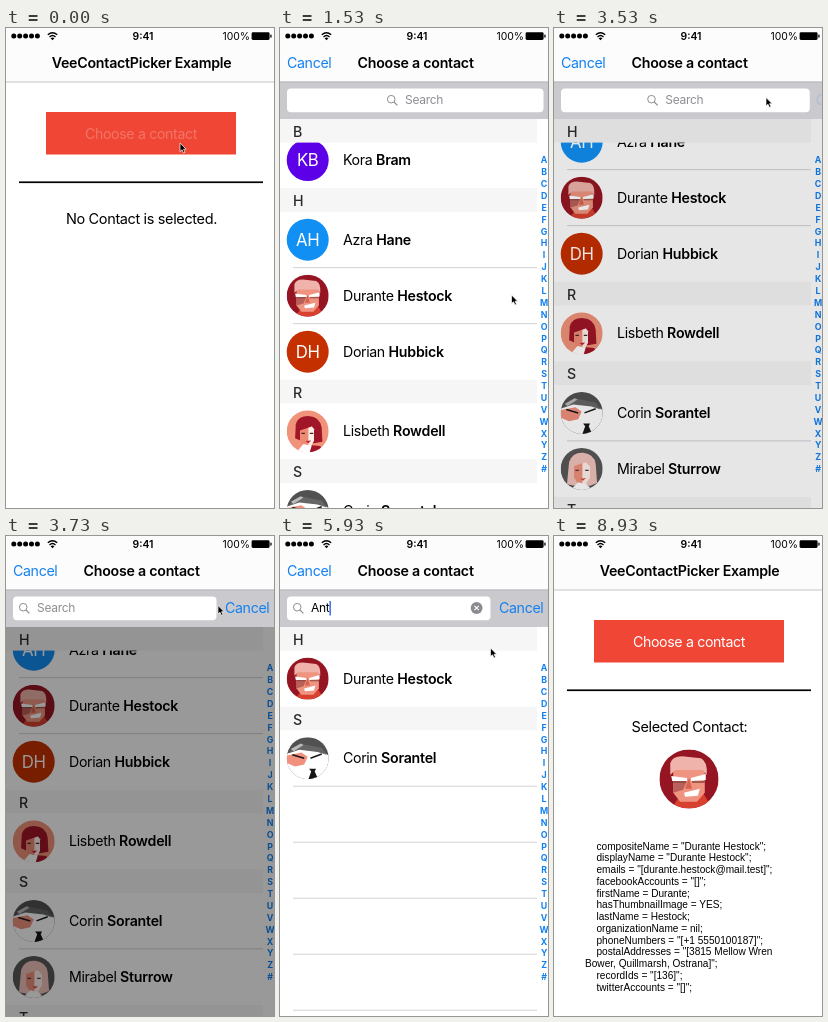
These frames come from a looping animation (268x480 px, 8990 ms). An HTML page:

```html
<!DOCTYPE html>
<html lang="en">
<head>
<meta charset="utf-8">
<title>Contact picker demo</title>
<style>
  html, body { margin: 0; width: 100%; height: 100%; overflow: hidden; background: #fff; }
  svg { display: block; width: 100%; height: 100%; }
  text { font: 14.2px Inter, "Open Sans", sans-serif; letter-spacing: -.025em; white-space: pre; }
  .b { font-weight: 600; letter-spacing: -.017em; }
  .mid { text-anchor: middle; }
  .link { fill: #1280f0; }
  .note { font-size: 14.5px; }
  .head { font-weight: 500; fill: #2b2b2b; }
  .init { font-size: 16.8px; fill: #fff; }
  .status { font-size: 10.4px; letter-spacing: 0; }
  .search { font-size: 12px; }
  .index { font-size: 8.8px; font-weight: 700; letter-spacing: 0; }
  .log { font: 10.1px "Liberation Sans", Arial, sans-serif; letter-spacing: 0; }
</style>
</head>
<body>
<svg id="stage" viewBox="0 0 268 480">
  <defs>
    <clipPath id="disc"><circle r="30"/></clipPath>
  </defs>
  <g id="scene"></g>
</svg>
<script>
const LOOP = 8990, FPS = 15, W = 268, H = 480;
const TOP = 91, ROW = 56, HEAD = 23.6, EDGE = 257;

const contacts = [
  ['Kora', 'Bram', '#5c00e8'],
  ['Azra', 'Hane', '#128ff2'],
  ['Durante', 'Hestock', 'hero'],
  ['Dorian', 'Hubbick', '#c53000'],
  ['Lisbeth', 'Rowdell', 'bob'],
  ['Corin', 'Sorantel', 'suit'],
  ['Mirabel', 'Sturrow', 'blonde'],
  ['Jonah', 'Tarrick', '#2a9d6f'],
];
const chosen = contacts[2];

const log = [
  'compositeName = "Durante Hestock";',
  'displayName = "Durante Hestock";',
  'emails = "[durante.hestock@mail.test]";',
  'facebookAccounts = "[]";',
  'firstName = Durante;',
  'hasThumbnailImage = YES;',
  'lastName = Hestock;',
  'organizationName = nil;',
  'phoneNumbers = "[+1 5550100187]";',
  'postalAddresses = "[3815 Mellow Wren',
  'Bower, Quillmarsh, Ostrana]";',
  'recordIds = "[136]";',
  'twitterAccounts = "[]";',
];

// Pointer keys: time, x, y
const pointer = [
  [533, 174, 115], [1333, 231.5, 278], [1400, 231.5, 278], [1533, 231.5, 267],
  [2467, 223, 177.5], [2600, 223, 177.5], [3267, 212, 69.5], [5533, 212, 69.5],
  [5933, 210.5, 112], [6333, 202, 140], [7533, 202, 140], [7800, 261, 212],
  [8000, 261, 212], [8133, 272, 228],
];

const clamp = v => Math.min(1, Math.max(0, v));
const part = (t, a, b) => clamp((t - a) / (b - a));
const easeOut = p => 1 - (1 - p) ** 3;
const smooth = p => p * p * (3 - 2 * p);
const within = (t, a, b) => t >= a && t < b;

const rect = (x, y, w, h, fill, more = '') =>
  `<rect x="${x}" y="${y}" width="${w}" height="${h}" fill="${fill}" ${more}/>`;
const text = (x, y, s, cls = '', more = '') =>
  `<text x="${x}" y="${y}" class="${cls}" ${more}>${s}</text>`;
const path = (d, fill) => `<path d="${d}" fill="${fill}"/>`;
const stroke = (d, color, w) =>
  `<path d="${d}" fill="none" stroke="${color}" stroke-width="${w}"/>`;
const move = (x, y, body) => `<g transform="translate(${x} ${y})">${body}</g>`;

const faces = {
  hero: rect(-30, -30, 60, 60, '#961522') +
    path('M-18 30L-9 17L14 14L24 30Z', '#d8402f') +
    path('M-16-10H16V14L8 23H-9L-16 14Z', '#ef9480') +
    path('M-16 2H-2L-6 11L-16 14Z', '#b9605a') +
    path('M-19-4V-16Q-17-23-7-23L12-21Q19-18 18-4L14-9H-14Z', '#efb3ab') +
    path('M-18-3L-2-1V2L-17 2ZM2-1L17-5V1L2 2Z', '#fff') +
    stroke('M-16 3H-3M3 3H16', '#8b4540', 1.6) +
    path('M0-1L-4 10H3Z', '#d8614f') +
    path('M-5 14L11 10L9 17L-4 18Z', '#fff'),
  bob: rect(-30, -30, 60, 60, '#f1937a') +
    path('M-18 10L-17-10Q-14-22 1-22Q18-21 20-5L21 15L9 17L-9 14Z', '#a01528') +
    path('M-11-1L6-7L9-3V13L5 21H-6L-11 13Z', '#ed8b75') +
    path('M1-5L6-7L9-3V13L5 21H1Z', '#fff1e9') +
    path('M-16 30L-6 18L6 21L3 30Z', '#fff') +
    path('M3 30L6 20L18 21L22 30Z', '#a01528') +
    stroke('M-9 3H-4M3 3H8', '#4c2228', 1.8) +
    path('M-3 14L5 13L1 17Z', '#c32032'),
  suit: rect(-30, -30, 60, 60, '#515151') +
    path('M-30-6L-12-14L20-10L30-4V30H-30Z', '#fff') +
    path('M-30-4L-9-8L0-2L-5 9L-18 12L-30 7Z', '#f0907d') +
    path('M-27-7Q-20-20-6-20L20-15L27-5L14-9L-12-12Z', '#666') +
    path('M-24-13L-10-21L-6-19L-20-10Z', '#bbb') +
    stroke('M-22-5L-5 0M4 0L20-6', '#171717', 2.2) +
    path('M-30 30V20L-19 25L-14 30ZM20 30L24 20L30 16V30Z', '#202020') +
    path('M2 15H12L10 19L15 30H1L5 19Z', '#161616'),
  blonde: rect(-30, -30, 60, 60, '#585858') +
    path('M-21 22L-18-10Q-13-24 2-23Q18-21 20-7L22 20L12 24H-10Z', '#f0c3bb') +
    path('M-11-4L6-10L12-3V12L6 22H-5L-11 12Z', '#ee8f7b') +
    path('M1-8L6-10L12-3V12L6 22H1Z', '#fff0ea') +
    path('M-16 30L-5 19L7 22L15 30Z', '#fff') +
    stroke('M-9 2H-4M5 2H10', '#493d3d', 1.7) +
    path('M-2 14L6 13L2 17Z', '#cf4942'),
};

function avatar([first, last, look], x, y, r) {
  if (faces[look]) {
    return `<g transform="translate(${x} ${y}) scale(${r / 30})"><g clip-path="url(#disc)">${faces[look]}</g></g>`;
  }
  return `<circle cx="${x}" cy="${y}" r="${r}" fill="${look}"/>` +
    text(x, y + 6.4, first[0] + last[0], 'init mid');
}

function statusBar() {
  let s = '';
  for (let i = 0; i < 5; i++) s += `<circle cx="${7.8 + i * 5.9}" cy="8" r="2.5"/>`;
  s += stroke('M41.8 6.8Q46.5 2.6 51.2 6.8M43.5 8.9Q46.5 6.2 49.5 8.9', '#000', 1.4);
  s += path('M46.5 12.2L44.6 10.3Q46.5 8.8 48.4 10.3Z', '#000');
  s += text(137, 11.8, '9:41', 'status b mid') + text(216.5, 11.8, '100%', 'status');
  s += rect(245.6, 4.3, 18, 7.6, '#000', 'rx="1.4"') + rect(264.3, 6.5, 1.3, 3.2, '#000', 'rx=".6"');
  return s;
}

function navBar(title) {
  return rect(0, 0, W, 54, '#fcfcfc') + rect(0, 53.6, W, .8, '#b4b4b6') +
    text(135.6, 40, title, 'b mid');
}

function home(t) {
  let s = rect(0, 0, W, H, '#fff') + navBar('VeeContactPicker Example');
  s += rect(40, 84, 190, 42.5, '#ef4635');
  s += text(135, 110.5, 'Choose a contact', 'mid', `fill="#fff" fill-opacity="${t < 200 ? .25 : 1}"`);
  s += rect(13, 153.4, 244, 1.7, '#000');
  if (t < 6600) return s + text(135.5, 196, 'No Contact is selected.', 'note mid');
  s += text(135.5, 196, 'Selected Contact:', 'note mid') + avatar(chosen, 135, 243, 29.6);
  log.forEach((line, i) => {
    s += text(i === 10 ? 31 : 42.5, 313.7 + i * 11.75, line, 'log');
  });
  return s;
}

function list(query, scroll, picked) {
  const hits = contacts.filter(c => (c[0] + ' ' + c[1]).toLowerCase().includes(query.toLowerCase()));
  const heads = [];
  let y = TOP - scroll, s = rect(0, TOP, W, H - TOP, '#fff');
  const line = at => rect(13, at - .4, EDGE - 13, .8, '#c8c7cc');
  hits.forEach((c, i) => {
    const key = c[1][0], next = hits[i + 1];
    if (!i || hits[i - 1][1][0] !== key) {
      heads.push([key, y]);
      y += HEAD;
    }
    if (y < H && y > TOP - ROW) {
      if (picked && c === chosen) s += rect(0, y, EDGE, ROW, '#b4b4b4');
      s += avatar(c, 27.7, y + 28, 21) +
        text(63, y + 33, `${c[0]} <tspan class="b">${c[1]}</tspan>`);
    }
    y += ROW;
    if (!next || next[1][0] === key) s += line(y);
  });
  for (y += ROW; y < H; y += ROW) s += line(y);

  heads.forEach(([key, at], i) => {
    const limit = i + 1 < heads.length ? heads[i + 1][1] - HEAD : H;
    const top = Math.min(Math.max(TOP, at), limit);
    s += rect(0, top, EDGE, HEAD, '#f6f6f6') + text(13, top + 17.9, key, 'head');
  });
  [...'ABCDEFGHIJKLMNOPQRSTUVWXYZ#'].forEach((ch, i) => {
    s += text(264.1, 135.3 + i * 11.88, ch, 'index link mid');
  });
  return s;
}

function searchBar(t, query) {
  const p = smooth(part(t, 3470, 3733)), slide = 94 * (1 - p);
  let s = rect(0, 54, W, 37, '#c9c9ce') + rect(0, 53.6, W, .8, '#b4b4b6');
  s += rect(7, 60.5, 256.5 - 53 * p, 23.7, '#fff', 'rx="4"');
  s += move(18 + slide, 72,
    '<circle cx="-.8" cy="-.8" r="3.8" fill="none" stroke="#8e8e93"/>' + stroke('M2 2L5.4 5.4', '#8e8e93', 1.2));
  s += query
    ? text(31, 76.3, query, 'search', 'id="query"')
    : text(31 + slide, 76.3, 'Search', 'search', 'fill="#8e8e93"');
  if (query) {
    s += '<circle cx="196.6" cy="72" r="5.9" fill="#8a8a8f"/>' +
      stroke('M194.4 69.8L198.8 74.2M198.8 69.8L194.4 74.2', '#fff', 1.1);
  }
  const blink = within(t, 4000, 4260) || within(t, 5330, 5530) || within(t, 6330, 6590);
  if (t >= 3795 && !blink) s += rect(31, 65, 1.5, 14.5, '#3f6be8', 'id="caret"');
  if (p) s += text(219 + 50 * (1 - p), 76.8, 'Cancel', 'link', `opacity="${p}"`);
  return s;
}

function picker(t) {
  const query = 'Ant'.slice(0, (t > 4260) + (t > 4530) + (t > 4860));
  const scroll = query ? 0 : 10.5 * part(t, 1400, 1533) + 98 * smooth(part(t, 1533, 2467));
  let s = list(query, scroll, t >= 6595);
  if (!query) s += rect(0, TOP, W, H - TOP, '#000', `opacity="${.4 * part(t, 3470, 3733)}"`);
  return s + navBar('Choose a contact') + text(7, 40, 'Cancel', 'link') + searchBar(t, query);
}

function arrow(t) {
  let [, x, y] = pointer[0];
  for (let i = 1; i < pointer.length; i++) {
    const [a, x0, y0] = pointer[i - 1], [b, x1, y1] = pointer[i];
    if (t < a) break;
    const p = part(t, a, b), k = i === 4 || i === 6 ? smooth(p) : p;
    x = x0 + (x1 - x0) * k;
    y = y0 + (y1 - y0) * k;
  }
  return move(x, y, '<path d="M0 0V8.6L2 6.8L3.5 10L5 9.3L3.6 6.2H6.2Z" stroke="#fff" stroke-width=".7"/>');
}

const scene = document.getElementById('scene');

function draw(t) {
  const up = t < 200 ? 0 : easeOut(part(t, 150, 605));
  const down = easeOut(part(t, 6942, 7397));
  const top = H * (1 - up + down);
  scene.innerHTML = home(t) + (top < H ? move(0, top, picker(t)) : '') + statusBar() + arrow(t);
  const typed = document.getElementById('query'), caret = document.getElementById('caret');
  if (typed && caret) caret.setAttribute('x', 31 + typed.getComputedTextLength());
}

const start = performance.now();
let shown = -1;

function tick() {
  const t = (performance.now() - start) % LOOP;
  const step = Math.floor(t * FPS / 1000 + .15);
  if (step !== shown) {
    shown = step;
    draw(step * 1000 / FPS);
  }
  requestAnimationFrame(tick);
}
tick();
</script>
</body>
</html>
```
